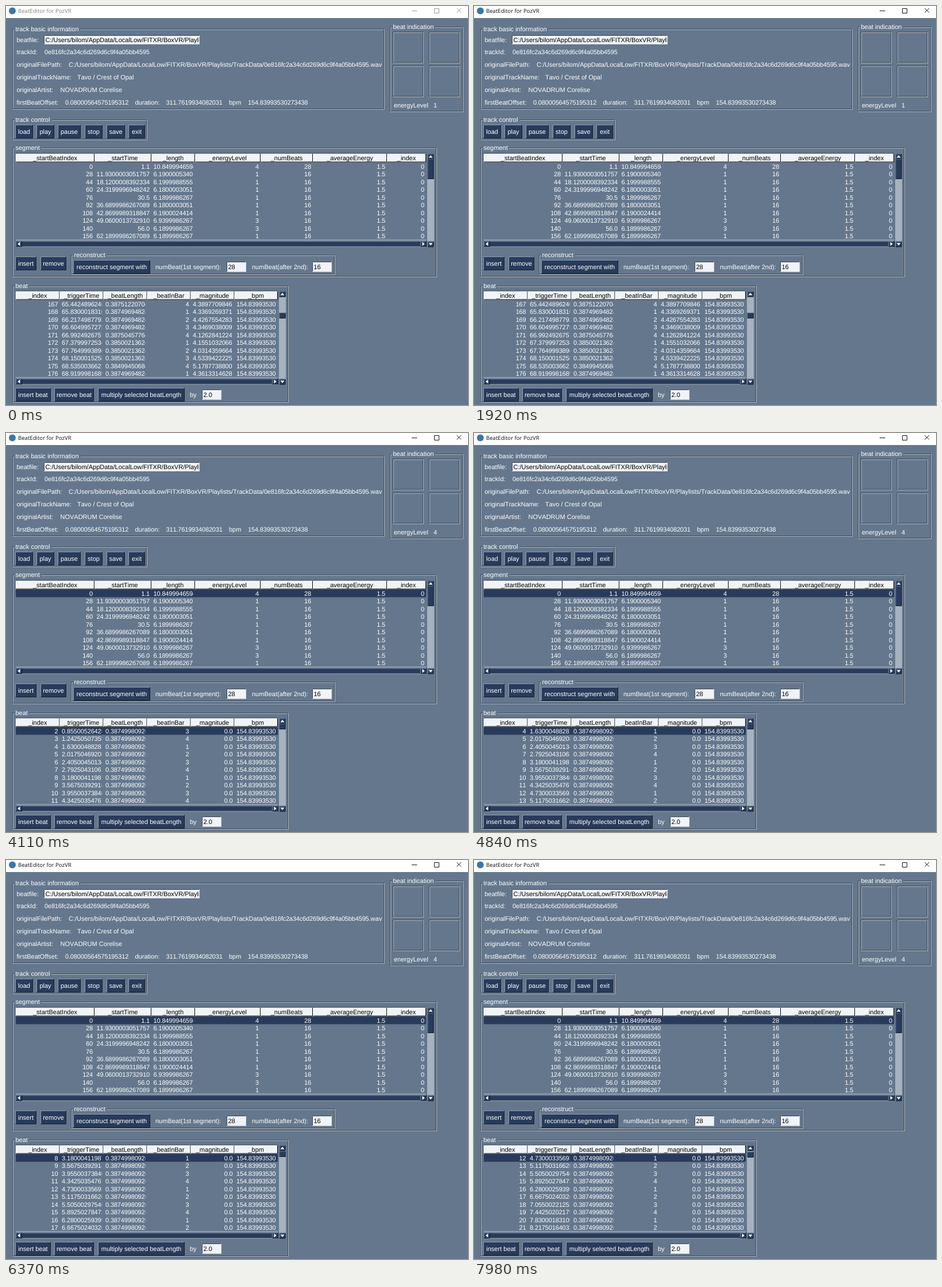
An HTML page that plays this animation: 804x696 px, repeating every 8000 ms.

```html
<!DOCTYPE html>
<html lang="en">
<head>
<meta charset="utf-8">
<title>BeatEditor</title>
<style>
  html, body { margin: 0; width: 100%; height: 100%; overflow: hidden; background: #64778d; }
  svg { display: block; }
  text {
    font: 11px "Liberation Sans", Arial, sans-serif;
    font-kerning: none;
    text-rendering: geometricPrecision;
    white-space: pre;
    fill: #fff;
  }
  .num { letter-spacing: -0.16px; }
  .dark { fill: #000; }
  .mid { text-anchor: middle; }
  .end { text-anchor: end; }
  #caption text { font: 9.6px "Open Sans", "Noto Sans", sans-serif; fill: inherit; }
</style>
</head>
<body>
<svg id="stage" width="804" height="696" viewBox="0 0 804 696"></svg>
<script>
const BG = '#64778d', NAVY = '#283b5b', PALE = '#f0f3f7', TROUGH = '#a6b2be';
const LIGHT = '#b1bbc6', SHADE = '#3c4755';
const ROW = 13.46, LOOP = 8000;

const rect = (x, y, w, h, fill, extra = '') =>
  `<rect x="${x}" y="${y}" width="${w}" height="${h}" fill="${fill}" ${extra}/>`;
const text = (x, y, s, cls = '') => `<text x="${x}" y="${y}" class="${cls}">${s}</text>`;
const line = (d, stroke, w = 1) => `<path d="${d}" fill="none" stroke="${stroke}" stroke-width="${w}"/>`;

// Two-tone box edge: first colour on top and left, second on bottom and right
const bevel = (x, y, w, h, a, b) =>
  line(`M${x + .5} ${y + h - .5}V${y + .5}H${x + w - .5}`, a) +
  line(`M${x + .5} ${y + h - .5}H${x + w - .5}V${y + .5}`, b);

const groove = (x, y, r, b) =>
  bevel(x, y, r - x, b - y, SHADE, LIGHT) +
  bevel(x + 1, y + 1, r - x - 2, b - y - 2, LIGHT, SHADE);

const frame = (x, y, r, b, label, w) =>
  groove(x, y, r, b) + rect(x + 4, y - 2, w + 3, 6, BG) + text(x + 5.5, y + 4, label);

const button = (x, y, r, label) =>
  rect(x, y, r - x, 22, NAVY) + bevel(x - 1, y - 1, r - x + 2, 24, '#8d9db0', '#141e2f') +
  text((x + r) / 2, y + 15, label, 'mid');

const input = (x, y, r, h, value) =>
  rect(x, y, r - x, h, PALE) + bevel(x, y, r - x, h, SHADE, '#d5dbe2') +
  `<svg x="${x}" y="${y}" width="${r - x - 1}" height="${h}">${text(2.5, h / 2 + 4, value, 'dark')}</svg>`;

const arrow = (cx, cy, turn) =>
  rect(cx - 5.5, cy - 5, 11, 10, NAVY) +
  bevel(cx - 5.5, cy - 5, 11, 10, '#71829a', '#141e2f') +
  `<path d="M-3.5 2L0 -2.2L3.5 2Z" fill="#fff" transform="translate(${cx} ${cy}) rotate(${turn})"/>`;

const thumb = (x, y, h, id) =>
  `<g id="${id}">${rect(x, y, 11, h, NAVY)}${bevel(x, y, 11, h, '#52647f', '#141e2f')}</g>`;

// Header cells, then both scroll bars
function grid(edges, names, top, bottom, thumbH, id) {
  const right = edges.at(-1), low = bottom - 11;
  let s = rect(17, top, right - 17, 15, PALE);
  names.forEach((n, i) => {
    const a = edges[i], b = edges[i + 1];
    s += bevel(a, top, b - a, 15, '#fff', '#000') + text((a + b) / 2, top + 11.8, n, 'dark mid');
  });
  s += line(`M17 ${top - .5}H${right}`, SHADE) + line(`M17 ${low - 1.5}H${right}`, LIGHT);
  s += rect(right + 2, top, 12, bottom - top, TROUGH);
  s += arrow(right + 8, top + 5, 0) + arrow(right + 8, bottom - 5, 180);
  s += thumb(right + 2.5, top + 9.5, thumbH, id);
  s += rect(17, low, right - 16, 11, NAVY) + bevel(17, low, right - 16, 11, LIGHT, LIGHT);
  s += line(`M28 ${low + 1.5}H${right - 10}`, '#52647f');
  s += arrow(22.5, low + 5.5, -90) + arrow(right - 4.5, low + 5.5, 90);
  return s;
}

// One row; columns in "long" start at the left and are cut at the cell edge
function cells(edges, values, y, long) {
  return values.map((v, i) => {
    const a = edges[i], b = edges[i + 1];
    return long.includes(i)
      ? `<svg x="${a}" y="${y}" width="${b - a - 3}" height="14">${text(3.6, 11, v, 'num')}</svg>`
      : text(b - 3, y + 11, v, 'num end');
  }).join('');
}

const segEdges = [17, 154, 253, 329, 443, 534, 663, 731];
const segNames = ['_startBeatIndex', '_startTime', '_length', '_energyLevel', '_numBeats', '_averageEnergy', '_index'];
const segStart = ['1.1', '11.9300003051757', '18.1200008392334', '24.3199996948242', '30.5',
  '36.6899986267089', '42.8699989318847', '49.0600013732910', '56.0', '62.1899986267089'];
const segLength = ['10.8499946594', '6.1900005340', '6.1999988555', '6.1800003051', '6.1899986267',
  '6.1800003051', '6.1900024414', '6.9399986267', '6.1899986267', '6.1899986267'];
const segEnergy = '4111111331';

const beatEdges = [17, 93.5, 169.5, 245.5, 321.5, 397.5, 473];
const beatNames = ['_index', '_triggerTime', '_beatLength', '_beatInBar', '_magnitude', '_bpm'];
const lateTime = ['65.4424896240', '65.8300018310', '66.2174987792', '66.6049957275', '66.9924926757',
  '67.3799972534', '67.7649993896', '68.1500015258', '68.5350036621', '68.9199981689'];
const lateLength = ['3875122070', '3874969482', '3874969482', '3874969482', '3875045776',
  '3850021362', '3850021362', '3850021362', '3849945068', '3874969482'];
const lateMag = ['4.3897709846', '4.3369269371', '4.4267554283', '4.3469038009', '4.1262841224',
  '4.1551032066', '4.0314359664', '4.5339422225', '5.1787738800', '4.3613314628'];

function segRows() {
  return segStart.map((t, i) => cells(segEdges,
    [i ? 12 + 16 * i : 0, t, segLength[i], segEnergy[i], i ? 16 : 28, '1.5', 0],
    273 + i * ROW, t.length > 5 ? [1, 2] : [2])).join('');
}

function beatRows(first) {
  const late = first === 167;
  let s = '';
  for (let k = 0; k < 10; k++) {
    const i = first + k;
    const time = late ? lateTime[k] : (0.08000564575195 + i * 0.387499809265).toFixed(11);
    const span = late ? `0.${lateLength[k]}4` : '0.38749980926';
    s += cells(beatEdges, [i, time, span, i % 4 + 1, late ? lateMag[k] : '0.0', '154.839935302'],
      513 + k * ROW, late ? [1, 2, 4, 5] : [1, 2, 5]);
  }
  return s;
}

const hash = '0e816fc2a34c6d269d6c9f4a05bb4595';
const folder = 'C:/Users/bilom/AppData/LocalLow/FITXR/BoxVR/Playlists';

function scene() {
  let s = rect(0, 0, 804, 696, BG) + rect(0, 0, 804, 21, '#fff');
  s += '<circle cx="11" cy="8.5" r="6" fill="#3b76a8"/>';
  s += `<g id="caption">${text(21, 12, 'BeatEditor for PozVR')}
    <path d="M706 8.5H715.5M745.5 4.5H753.5V12.5H745.5ZM784.5 4L792 11.5M792 4L784.5 11.5" fill="none"/></g>`;

  s += frame(11, 40, 659, 181, 'track basic information', 112);
  s += text(18.5, 62.5, 'beatfile:') + input(66, 51, 337, 16, folder);
  s += text(18.5, 84, 'trackId:') + text(67, 84, hash, 'num');
  s += text(18.5, 106, 'originalFilePath:') +
    `<text x="109" y="106">${folder}/TrackData/<tspan class="num">${hash}</tspan>.wav</text>`;
  s += text(18.5, 128.3, 'originalTrackName:') + text(124, 128.3, 'Tavo / Crest of Opal');
  s += text(18.5, 150.2, 'originalArtist:') + text(94.5, 150.2, 'NOVADRUM Corelise');
  s += text(18.5, 172, 'firstBeatOffset:') + text(103, 172, '0.08000564575195312', 'num');
  s += text(224.5, 172, 'duration:') + text(278.5, 172, '311.7619934082031', 'num');
  s += text(388, 172, 'bpm') + text(421, 172, '154.83993530273438', 'num');

  s += frame(668, 36, 796, 185, 'beat indication', 72);
  for (const y of [45, 104]) for (const x of [673, 736]) s += groove(x, y, x + 54, y + 55);
  s += text(675, 176.5, 'energyLevel') + '<text id="energy" x="744" y="176.5"></text>';

  s += frame(11, 198, 246, 234, 'track control', 62);
  for (const [x, r, n] of [[17, 46, 'load'], [54, 83, 'play'], [91, 129, 'pause'],
    [138, 167, 'stop'], [176, 206, 'save'], [214, 241, 'exit']]) s += button(x, 208, r, n);

  s += frame(11, 247, 750, 473, 'segment', 43);
  s += rect(17, 273, 714, 13.4, NAVY, 'class="pick"');
  s += grid(segEdges, segNames, 257.5, 420.5, 35, 'segThumb') + segRows();
  s += button(17, 438, 52, 'insert') + button(61, 438, 104, 'remove');

  s += frame(113, 434, 573, 469, 'reconstruct', 56);
  s += button(118, 444, 250, 'reconstruct segment with');
  s += text(260, 459, 'numBeat(1st segment):') + input(384, 446, 418, 18, '28');
  s += text(428, 459, 'numBeat(after 2nd):') + input(533, 446, 567, 18, '16');

  s += frame(11, 488, 492, 692, 'beat', 22);
  s += rect(17, 513, 456, 13.4, NAVY, 'class="pick"');
  s += grid(beatEdges, beatNames, 497.5, 660.5, 10, 'beatThumb') + '<g id="beats"></g>';
  s += button(17, 667, 77, 'insert beat') + button(85, 667, 152, 'remove beat');
  s += button(161, 667, 310, 'multiply selected beatLength');
  s += text(320, 682, 'by') + input(341, 669, 375, 18, '2.0');

  s += `<path id="cursor" d="M0 0V14L3.2 11.1L5.4 16L7.7 15L5.5 10.3H10.2Z"
    fill="#fff" stroke="#222" stroke-width=".7"/>`;
  return s;
}

const $ = id => document.getElementById(id);
$('stage').innerHTML = scene();
const picks = document.querySelectorAll('.pick');

// [time, x, y]; no place means hidden
const cursorSteps = [[0], [260, 524.5, 652], [330], [930, -4, 88], [1000, 12, 108], [1060, 34, 136],
  [1130, 58, 168], [1190, 81, 196], [1260, 97, 215], [1340, 102, 217], [1400, 100, 216.5], [1460],
  [1660, 67, 219], [1750, 65, 231], [1840, 63, 241], [1920]];
const beatTimes = [3310, 3710, 4110, 4440, 4840, 5240, 5640, 6050, 6370, 6780, 7180, 7580, 7980];

let shown = -1;
function draw(now) {
  const t = now % LOOP;

  const [, x, y] = cursorSteps.findLast(step => step[0] <= t);
  $('cursor').setAttribute('visibility', x === undefined ? 'hidden' : 'visible');
  if (x !== undefined) $('cursor').setAttribute('transform', `translate(${x} ${y})`);

  const active = t >= 1660;
  $('caption').setAttribute('fill', active ? '#111' : '#858585');
  $('caption').setAttribute('stroke', 'none');
  $('caption').lastElementChild.setAttribute('stroke', active ? '#111' : '#999');

  const count = beatTimes.filter(b => b <= t).length;
  const first = count ? count - 1 : 167;
  if (first !== shown) {
    shown = first;
    $('beats').innerHTML = beatRows(first);
    $('energy').textContent = count ? 4 : 1;
    picks.forEach(p => p.setAttribute('visibility', count ? 'visible' : 'hidden'));
    const drop = count ? Math.floor(first / 5) : 28;
    $('beatThumb').setAttribute('transform', `translate(0 ${drop})`);
  }
}

const origin = performance.now();
function tick() {
  draw(performance.now() - origin);
  requestAnimationFrame(tick);
}
tick();
</script>
</body>
</html>
```
